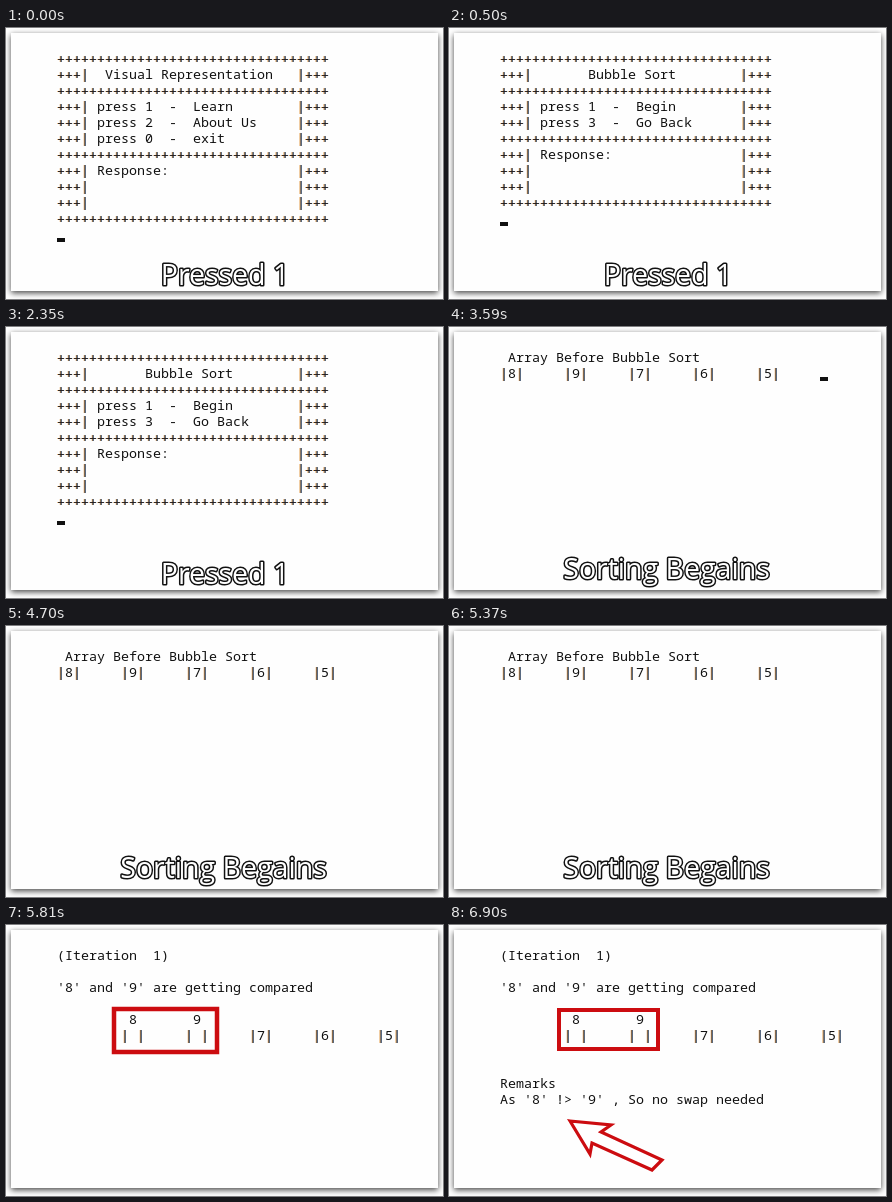
Write an HTML page that moves like this. It is 437 px wide and 271 px high and loops after 8 s.

```html
<!DOCTYPE html>
<html lang="en">
<head>
<meta charset="utf-8">
<title>Bubble sort console</title>
<style>
html, body { margin: 0; width: 100%; height: 100%; overflow: hidden; background: #fff; }
#card { position: absolute; left: 5px; top: 5px; width: 427px; height: 258px; background: #fefefe; box-shadow: 0 2px 6px #444; }
#screen { position: absolute; left: 51px; top: 22px; margin: 0; color: #111; font: 13.3333px/16px "Noto Sans Mono", monospace; font-variant-ligatures: none; }
/* dark strokes with the warm and cool fringes of subpixel smoothing */
#screen i, #screen b { font: inherit; color: #1c1a20; text-shadow: -.8px 0 #e39a45, .5px 0 #8fb4dc; }
#screen b { position: relative; top: 1px; }
#cursor { position: absolute; width: 8px; height: 4px; background: #111; }
svg { position: absolute; left: 0; top: 0; }
#caption { font: 28.5px "Open Sans", "Noto Sans", sans-serif; text-anchor: middle; fill: #fff; stroke: #111; stroke-width: 3px; stroke-linejoin: round; paint-order: stroke; }
#box, #arrow { fill: none; stroke: #cc0c10; }
#arrow { fill: #fff; stroke-width: 3.2px; }
</style>
</head>
<body>
<div id="card"></div>
<pre id="screen"></pre>
<div id="cursor"></div>
<svg width="437" height="271">
  <text id="caption"></text>
  <rect id="box"/>
  <path id="arrow" d="M121 196 L162 200 L152 207 L213 235 L203 245 L143 218 L141 229 Z"/>
</svg>
<script>
const $ = id => document.getElementById(id);
const rule = '+'.repeat(34);
const row = (text = '') => '+++|' + text.padEnd(26) + '|+++';

const menu = (title, ...items) => [
  rule, row(title), rule, ...items.map(row), rule,
  row(' Response:'), row(), row(), rule
];
const cells = list => list.map(v => `|${v}|`).join('     ');

const before = [' Array Before Bubble Sort', cells([8, 9, 7, 6, 5])];
const compare = [
  '(Iteration  1)', '', "'8' and '9' are getting compared", '',
  '         8       9', '        ' + cells([' ', ' ', 7, 6, 5])
];
const remarks = [...compare, '', '', 'Remarks', "As '8' !> '9' , So no swap needed"];

const pressed = ['Pressed 1', 219, 257];
const sorting = ['Sorting Begains', 217.5, 251.5];

// cursor: [column, row]; box: [x, y, width, height, stroke]
const scenes = [
  { at: 0, caption: pressed, cursor: [0, 11],
    lines: menu('  Visual Representation', ' press 1  -  Learn', ' press 2  -  About Us', ' press 0  -  exit') },
  { at: 500, caption: pressed, cursor: [0, 10],
    lines: menu('       Bubble Sort', ' press 1  -  Begin', ' press 3  -  Go Back') },
  { at: 3590, caption: sorting, cursor: [40, 1], lines: before },
  { at: 4700, caption: sorting, lines: before },
  { at: 5810, lines: compare, box: [108, 84, 103, 43, 4.5] },
  { at: 6900, lines: remarks, box: [110, 85, 99, 39, 4], arrow: true }
];

const set = (el, attrs) => {
  for (const k in attrs) el.setAttribute(k, attrs[k]);
};
const show = (el, on) => { el.style.display = on ? '' : 'none'; };

function draw({ lines, caption, cursor, box, arrow }) {
  $('screen').innerHTML = lines.join('\n').replace(/>/g, '&gt;')
    .replace(/\++/g, '<b>$&</b>').replace(/\|/g, '<i>|</i>');
  show($('cursor'), cursor);
  if (cursor) {
    $('cursor').style.left = 51 + cursor[0] * 8 + 'px';
    $('cursor').style.top = 34 + cursor[1] * 16 + 'px';
  }
  show($('caption'), caption);
  if (caption) {
    const [text, x, y] = caption;
    $('caption').textContent = text;
    set($('caption'), { x, y });
  }
  show($('box'), box);
  if (box) {
    const [x, y, width, height, stroke] = box;
    set($('box'), { x, y, width, height, 'stroke-width': stroke });
  }
  show($('arrow'), arrow);
}

const start = performance.now();
let current;
function tick() {
  const t = (performance.now() - start) % 8000;
  const scene = scenes.findLast(s => s.at <= t);
  if (scene !== current) draw(current = scene);
  requestAnimationFrame(tick);
}
tick();
</script>
</body>
</html>
```
